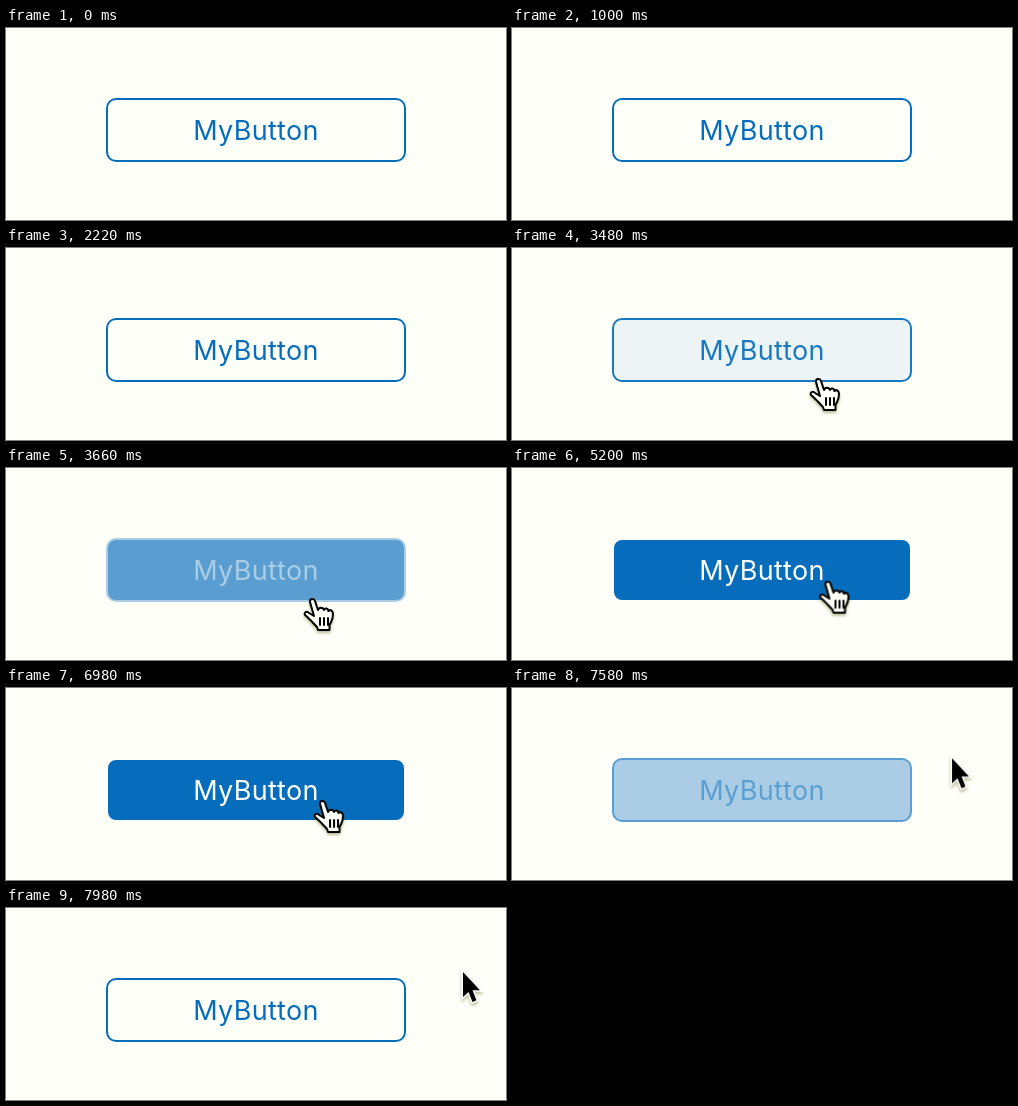
Recreate the animation shown at these times as an HTML page. Size 500x192 px, loop 8000 ms.

```html
<!DOCTYPE html>
<html lang="en">
<head>
<meta charset="utf-8">
<title>Button hover</title>
<style>
  html, body { margin: 0; width: 100%; height: 100%; overflow: hidden; background: #fffffa; }
  svg { display: block; width: 500px; height: 192px; }
  text { font: 400 27px Inter, "Liberation Sans", sans-serif; letter-spacing: .3px; text-anchor: middle; }
  #cursor { filter: drop-shadow(0 2px 1.5px rgba(100, 100, 20, .45)); }
  #hand { fill: #fffffa; stroke: #000; stroke-width: 2; stroke-linejoin: round; stroke-linecap: round; }
  #arrow { fill: #000; stroke: #fff; stroke-width: 3; paint-order: stroke; }
</style>
</head>
<body>
<svg viewBox="0 0 500 192">
  <rect id="fill" x="101" y="71" width="298" height="62" rx="9" fill="#066dbd"/>
  <rect id="border" x="101" y="71" width="298" height="62" rx="9" fill="none" stroke-width="2"/>
  <text id="label" x="250" y="112">MyButton</text>
  <g id="cursor">
    <g id="hand">
      <path d="M-2 2C-2.5 -1.5 2 -2 3 1L6 10C7 7 11 7 12 10C13 7.5 16 8 16.5 11C18.5 9 21 11 21 14C21 20 19.5 21 17.5 25V30H6L5 27C1 23 -3 18 -7 15C-8.5 12.5 -5 10.5 -3 13L2 16Z"/>
      <path d="M8 18V25M12 18V25M16 18V25" fill="none"/>
    </g>
    <path id="arrow" d="M1 2V27L6.5 22L10.5 32L14.5 30.2L10.5 20.3H18Z"/>
  </g>
</svg>
<script>
const LOOP = 8000, ENTER = 3430, LEAVE = 7350, FADE = 600;
const BLUE = '#066dbd', WHITE = '#fffffa';
const start = document.timeline.currentTime || 0;

function play(id, frames) {
  const anim = document.getElementById(id).animate(frames, { duration: LOOP, iterations: Infinity });
  anim.startTime = start;
}

// Holds a value, then eases to the next one in each move.
function tween(id, prop, from, moves) {
  const frames = [{ offset: 0, [prop]: from }];
  let value = from;
  for (const { at, time, to, easing = 'ease' } of moves) {
    frames.push({ offset: at / LOOP, [prop]: value, easing });
    frames.push({ offset: (at + time) / LOOP, [prop]: to });
    value = to;
  }
  play(id, [...frames, { offset: 1, [prop]: value }]);
}

const hover = (id, prop, rest, active) => tween(id, prop, rest, [
  { at: ENTER, time: FADE, to: active },
  { at: LEAVE, time: FADE, to: rest }
]);

// The pointer is a hand over the button and an arrow elsewhere.
const swap = (id, outside, over) => tween(id, 'opacity', outside, [
  { at: ENTER, time: 0, to: over },
  { at: LEAVE, time: 0, to: outside }
]);

hover('fill', 'opacity', 0, 1);
hover('border', 'stroke', BLUE, WHITE);
hover('label', 'fill', BLUE, WHITE);
swap('hand', 0, 1);
swap('arrow', 1, 0);

const pos = (x, y) => `translate(${x}px, ${y}px)`;
tween('cursor', 'transform', pos(288, 200), [
  { at: 3060, time: 420, to: pos(306, 132), easing: 'ease-out' },
  { at: 3880, time: 160, to: pos(309, 122) },
  { at: 4740, time: 700, to: pos(316, 114) },
  { at: 6980, time: 860, to: pos(456, 62), easing: 'cubic-bezier(.3, .1, .5, 1)' }
]);
</script>
</body>
</html>
```
